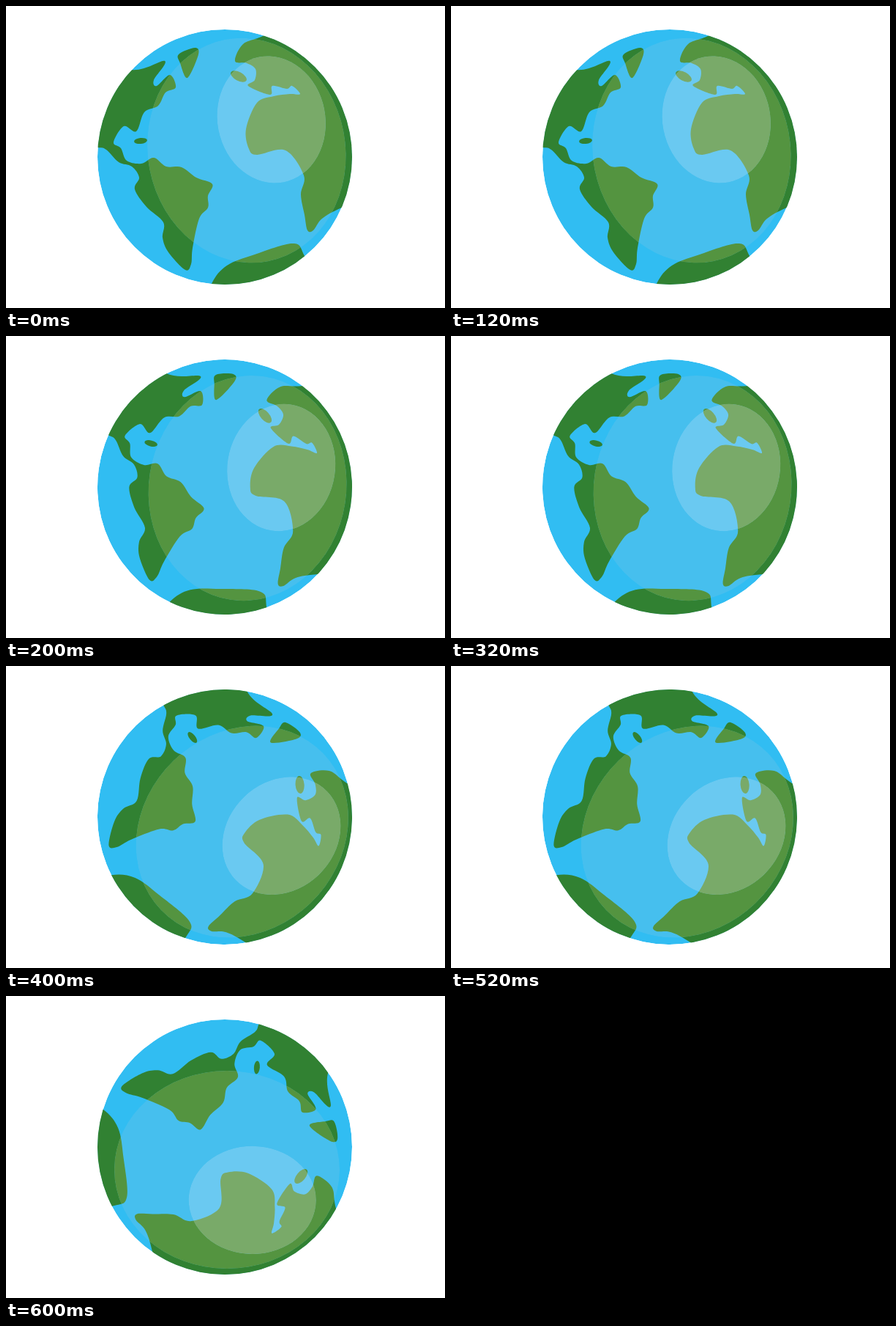
Animation, 600 px wide and 412 px high, one loop 800 ms. Source, as an HTML page with a canvas:

```html
<!DOCTYPE html>
<html lang="en">
<head>
<meta charset="utf-8">
<title>Turning globe</title>
<style>
  html, body { margin: 0; height: 100%; overflow: hidden; background: #fff; }
  canvas { display: block; }
</style>
</head>
<body>
<canvas id="stage" width="600" height="412"></canvas>
<script>
const ctx = document.getElementById('stage').getContext('2d');
const CX = 299, CY = 206;
const TURNS = [0, 19.7, 57, 101.2]; // degrees, one per step
const STEP = 200;
const rad = degrees => degrees * Math.PI / 180;

function ellipse(x, y, rx, ry, tilt = 0) {
  const path = new Path2D();
  path.ellipse(x, y, rx, ry, rad(tilt), 0, 2 * Math.PI);
  return path;
}

// Closed smooth curve through a few key points.
function coast(...xy) {
  const path = new Path2D();
  const n = xy.length / 2;
  const at = i => { const k = (i + n) % n * 2; return [xy[k], xy[k + 1]]; };
  path.moveTo(...at(0));
  for (let i = 0; i < n; i++) {
    const [a, b, c, d] = [at(i - 1), at(i), at(i + 1), at(i + 2)];
    path.bezierCurveTo(
      b[0] + (c[0] - a[0]) / 6, b[1] + (c[1] - a[1]) / 6,
      c[0] - (d[0] - b[0]) / 6, c[1] - (d[1] - b[1]) / 6,
      c[0], c[1]
    );
  }
  path.closePath();
  return path;
}

// Points beyond the rim are clipped away.
const americas = coast(
  100,60, 171,87, 217,75, 202,101, 206,109, 224,94, 232,111, 218,118, 208,136,
  189,145, 178,171, 161,164, 147,186, 157,194, 165,211, 185,215, 202,207,
  219,219, 240,220, 260,234, 282,243, 276,259, 276,275, 264,290, 255,330,
  253,352, 245,360, 222,336, 214,316, 215,295, 192,274, 176,250, 182,234,
  172,219, 154,213, 137,196, 125,193, 90,190
);
const eurasiaAfrica = coast(
  520,0, 420,10, 351,41, 324,52, 313,75, 329,78, 341,86, 340,101, 331,109,
  361,121, 364,109, 384,113, 391,109, 402,120, 388,120, 366,123, 343,132,
  328,168, 332,195, 343,203, 382,197, 407,231, 403,257, 408,285, 412,306,
  420,306, 432,290, 459,275, 520,250
);
const antarctica = coast(270,420, 281,379, 302,354, 340,339, 392,324, 408,341, 430,400);
const greenland = coast(236,66, 258,57, 263,66, 248,98, 238,78);
const cuba = ellipse(184, 184, 9, 4, -6);
const britain = ellipse(318, 96, 12, 6, 29);
const lands = [americas, eurasiaAfrica, antarctica, greenland, cuba, britain];

const globe = ellipse(CX, CY, 174, 174);
const lit = ellipse(328.8, 197, 135, 154, -11);
const shine = ellipse(362.7, 155, 73.7, 87, -11);

// Sea and land seen through one outline.
function paint(outline, sea, soil) {
  ctx.save();
  ctx.clip(outline);
  ctx.fillStyle = sea;
  ctx.fill(outline);
  ctx.fillStyle = soil;
  lands.forEach(land => ctx.fill(land));
  ctx.restore();
}

function draw(now) {
  const turn = TURNS[Math.floor(now / STEP) % TURNS.length];
  ctx.fillStyle = '#fff';
  ctx.fillRect(0, 0, 600, 412);
  ctx.save();
  ctx.translate(CX, CY);
  ctx.rotate(rad(turn));
  ctx.translate(-CX, -CY);
  paint(globe, '#31bdf2', '#318132');
  paint(lit, '#46bfee', '#549440');
  paint(shine, '#6ac9f1', '#79aa69');
  ctx.restore();
}

const start = performance.now();
function loop() {
  draw(performance.now() - start);
  requestAnimationFrame(loop);
}
loop();
</script>
</body>
</html>
```
